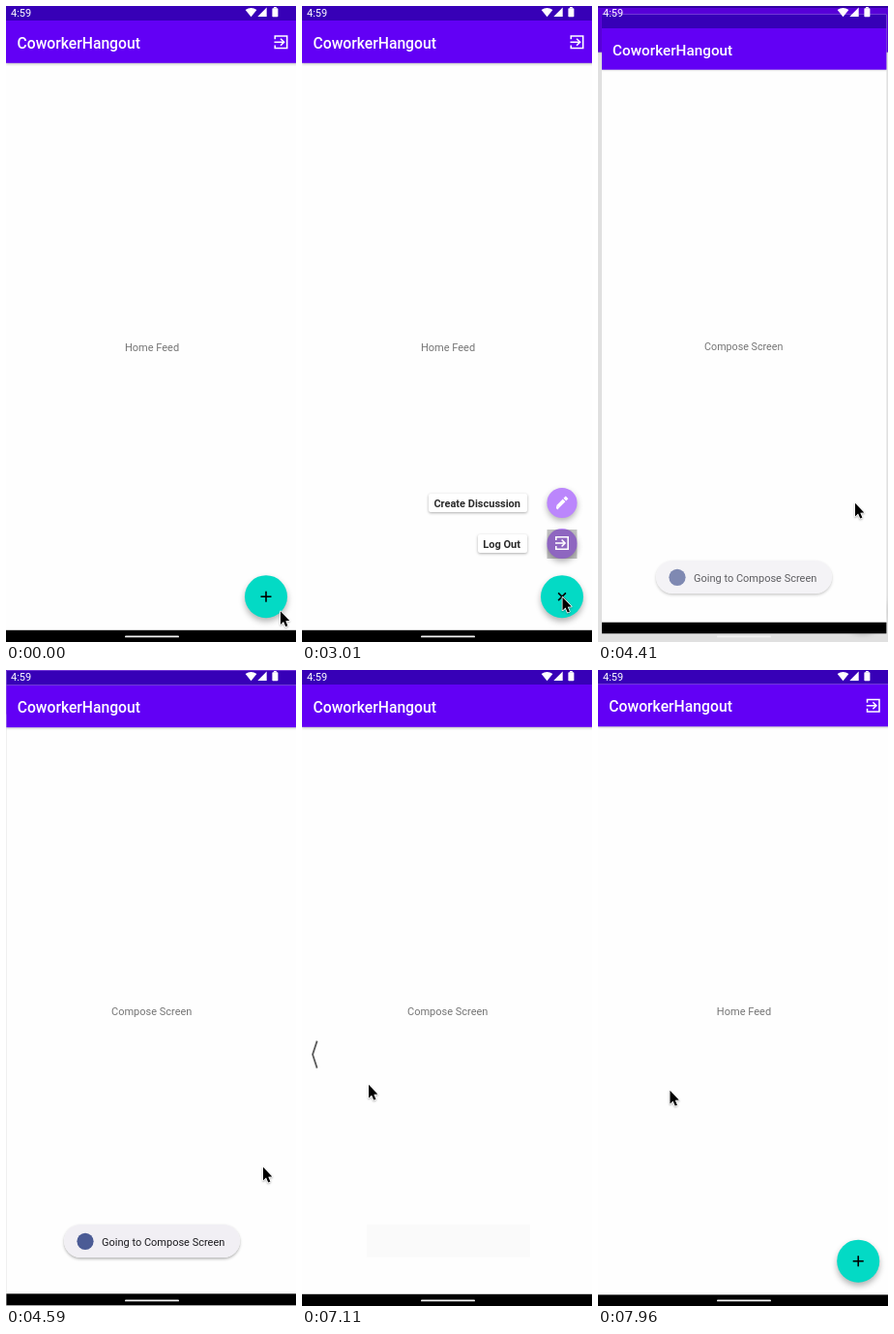
An HTML page with a canvas for the animation above (7990 ms loop, 300 px wide and 656 px high).

```html
<!DOCTYPE html>
<html lang="en">
<head>
<meta charset="utf-8">
<title>Speed dial navigation</title>
<style>
  html, body { margin: 0; width: 100%; height: 100%; overflow: hidden; background: #fefefe; }
  canvas { display: block; width: 300px; height: 656px; }
</style>
</head>
<body>
<canvas id="stage"></canvas>
<script>
const W = 300, H = 656, LOOP = 7990;
const WIN = 302.5; // the phone window runs slightly past the right edge
const canvas = document.getElementById('stage');
const ctx = canvas.getContext('2d');
const dpr = window.devicePixelRatio || 1;
canvas.width = W * dpr;
canvas.height = H * dpr;

const C = {
  status: '#3700b7', bar: '#6200f5', page: '#fefefe', grey: '#757575',
  teal: '#03dac5', lilac: '#bb86fc', toast: '#f1eff4', badge: '#4b5b95'
};
const OPEN = 4295, CLOSE = 7700, SLIDE = 400;

const clamp = v => Math.max(0, Math.min(1, v));
const ramp = (t, a, b) => clamp((t - a) / (b - a));
const smooth = p => p * p * (3 - 2 * p);
const mix = (a, b, p) => a + (b - a) * p;

// Two joined Bezier curves: quick start, very slow finish.
function slowIn(x) {
  if (x <= 0 || x >= 1) return clamp(x);
  const knee = 1 / 6;
  const [xs, ys] = x < knee
    ? [[0, 0.05, 0.133333, knee], [0, 0, 0.06, 0.4]]
    : [[knee, 0.208333, 0.25, 1], [0.4, 0.82, 1, 1]];
  const bez = (p, u) => {
    const v = 1 - u;
    return v * v * v * p[0] + 3 * v * v * u * p[1] + 3 * v * u * u * p[2] + u * u * u * p[3];
  };
  let lo = 0, hi = 1;
  for (let i = 0; i < 24; i++) {
    const mid = (lo + hi) / 2;
    if (bez(xs, mid) < x) lo = mid; else hi = mid;
  }
  return bez(ys, lo);
}

function group(draw, { x = 0, y = 0, scale = 1, turn = 0, alpha = 1 } = {}) {
  if (alpha <= 0 || scale <= 0) return;
  ctx.save();
  ctx.translate(x, y);
  ctx.rotate(turn);
  ctx.scale(scale, scale);
  ctx.globalAlpha *= alpha;
  draw();
  ctx.restore();
}

function rect(x, y, w, h, color) {
  ctx.fillStyle = color;
  ctx.fillRect(x, y, w, h);
}

function text(str, x, y, color, size = 11, weight = 400, align = 'left') {
  ctx.font = `${weight} ${size}px Roboto, sans-serif`;
  ctx.textAlign = align;
  ctx.fillStyle = color;
  ctx.fillText(str, x, y);
}

function disc(x, y, r, color) {
  ctx.beginPath();
  ctx.arc(x, y, r, 0, Math.PI * 2);
  ctx.fillStyle = color;
  ctx.fill();
}

function pill(x, y, w, h, r, color) {
  ctx.beginPath();
  ctx.roundRect(x, y, w, h, r);
  ctx.fillStyle = color;
  ctx.fill();
}

function poly(points, close = true) {
  ctx.beginPath();
  points.forEach(([x, y], i) => i ? ctx.lineTo(x, y) : ctx.moveTo(x, y));
  if (close) ctx.closePath();
}

function stroke(color, width) {
  ctx.strokeStyle = color;
  ctx.lineWidth = width;
  ctx.stroke();
}

function shadowed(blur, dy, alpha, draw) {
  ctx.save();
  ctx.shadowColor = `rgba(0,0,0,${alpha})`;
  ctx.shadowBlur = blur * dpr;
  ctx.shadowOffsetY = dy * dpr;
  draw();
  ctx.restore();
}

function exitIcon(x, y, size) {
  group(() => {
    poly([[-8, -4], [-8, -8], [8, -8], [8, 8], [-8, 8], [-8, 4]], false);
    stroke('#fff', 2);
    poly([[-9, 0], [3.5, 0]], false);
    stroke('#fff', 2);
    poly([[-0.5, -4.5], [4, 0], [-0.5, 4.5]], false);
    stroke('#fff', 2);
  }, { x, y, scale: size / 18 });
}

function pencilIcon() {
  group(() => {
    ctx.fillStyle = '#fff';
    ctx.fillRect(-6, -1.9, 9, 3.8);
    ctx.fillRect(4, -1.9, 3.2, 3.8);
    poly([[-6, -1.9], [-8.6, 0], [-8.6, 1.9], [-6, 1.9]]);
    ctx.fill();
  }, { turn: -Math.PI / 4 });
}

function frame(hasExit) {
  rect(0, 0, WIN, H, C.page);
  shadowed(2.5, 0.8, 0.25, () => rect(0, 15, WIN, 43.8, C.bar));
  rect(0, 0, WIN, 15, C.status);
  text('CoworkerHangout', 11.5, 43.5, '#fff', 15.7, 500);
  if (hasExit) exitIcon(284.5, 37.3, 14);
  rect(0, 643.8, WIN, H - 643.8, '#000');
}

function dialItem(label, y, left, p) {
  group(() => {
    shadowed(3, 1, 0.32, () => pill(left, y - 9.5, 233 - left, 19, 2, '#fff'));
    text(label, 226, y + 4, '#2b2b2b', 11, 700, 'right');
  }, { alpha: p });
  group(() => shadowed(6, 3, 0.3, () => disc(0, 0, 15.6, C.lilac)),
    { x: 269, y, scale: p });
}

function dial(t) {
  const shown = a => smooth(ramp(t, a, a + 150)) * (1 - smooth(ramp(t, 3990, 4190)));
  const low = shown(1450), high = shown(1510);
  if (low > 0) dialItem('Log Out', 554.5, 182, low);
  if (high > 0) dialItem('Create Discussion', 512.5, 131, high);
  if (t >= 1810 && t < 3990) rect(253.5, 540, 31, 30, 'rgba(0,0,0,.24)');
  group(() => exitIcon(0, 0, 14), { x: 269, y: 554, scale: low });
  group(pencilIcon, { x: 269, y: 512, scale: high });

  shadowed(6, 3.5, 0.3, () => disc(269, 609.2, 22, C.teal));
  group(() => {
    rect(-5.5, -0.8, 11, 1.6, '#000');
    rect(-0.8, -5.5, 1.6, 11, '#000');
  }, { x: 269, y: 609.2, turn: low * Math.PI / 4 });
}

function home(t) {
  frame(true);
  text('Home Feed', 151, 356, C.grey, 11, 400, 'center');
  dial(t);
}

function compose(t) {
  frame(false);
  text('Compose Screen', 150.7, 356, C.grey, 11, 400, 'center');
  if (t > 6560) rect(67, 572, 169, 33.5, '#fafafa');
}

function zoom(draw, scale, alpha = 1) {
  group(() => {
    ctx.translate(-WIN / 2, -H / 2);
    ctx.beginPath();
    ctx.rect(0, 0, WIN, H);
    ctx.clip();
    draw();
  }, { x: WIN / 2, y: H / 2, scale, alpha });
}

function screens(t) {
  const open = slowIn(ramp(t, OPEN, OPEN + SLIDE));
  const back = slowIn(ramp(t, CLOSE, CLOSE + SLIDE));
  if (t >= CLOSE) {
    zoom(() => home(0), mix(1.1, 1, back));
    zoom(() => compose(t), mix(1, 0.9, back), 1 - ramp(t, CLOSE + 35, CLOSE + 85));
    return;
  }
  if (open < 1) zoom(() => home(t), mix(1, 1.05, open));
  if (open > 0) {
    rect(0, 0, W, H, `rgba(0,0,0,${0.14 * open})`);
    zoom(() => compose(t), mix(0.85, 1, open), ramp(t, OPEN + 20, OPEN + 80));
  }
}

function toast(t) {
  const out = ramp(t, 6340, 6560);
  const alpha = ramp(t, 4300, 4460) * (1 - out);
  group(() => {
    // The shadow fades on its own so that it never tints the body.
    shadowed(3, 1.5, 0.3 * alpha, () => {
      ctx.globalAlpha = 1;
      pill(-91, -17, 182, 34, 17, C.page);
    });
    pill(-91, -17, 182, 34, 17, C.toast);
    disc(-69, 0.3, 8.6, C.badge);
    text('Going to Compose Screen', -52, 4.5, '#1c1b1f');
  }, { x: 151, y: 589, scale: mix(1, 0.93, out), alpha });
}

function systemBar() {
  text('4:59', 5, 11, '#fff');
  ctx.fillStyle = '#fff';
  ctx.beginPath();
  ctx.moveTo(253.5, 11.3);
  ctx.lineTo(247.6, 4);
  ctx.quadraticCurveTo(253.5, -0.2, 259.4, 4);
  ctx.closePath();
  ctx.fill();
  poly([[260.3, 11], [269.7, 11], [269.7, 1.6]]);
  ctx.fill();
  pill(275.4, 2.2, 6, 9, 0.8, '#fff');
  rect(277, 1, 2.8, 1.5, '#fff');
  pill(123, 649.5, 56, 1.8, 0.9, '#f2f2f2');
}

function chevron(t) {
  const p = smooth(ramp(t, 6985, 7090));
  group(() => {
    poly([[15.6, 382.6], [11, 396.6], [15.6, 410.6]], false);
    stroke('#5c5c5c', 1.8);
  }, { x: mix(-14, 0, p), alpha: p * (1 - ramp(t, 7220, 7300)) });
}

const path = [
  [0, 284, 625], [90, 284, 625], [380, 268.5, 614.5], [1000, 268.5, 614.5],
  [1090, 268.5, 613], [1780, 268.5, 613], [1810, 269.5, 610.5], [3010, 269.5, 610.5],
  [3400, 262.5, 500], [3630, 266, 513.5], [5360, 266, 513.5], [5770, 103, 499],
  [6140, 10, 474], [6170, 9, 473], [6640, 1.5, 435], [6970, 1.5, 435],
  [7110, 69, 428.5], [7300, 74.5, 434.5], [LOOP, 74.5, 434.5]
];

function pointer(t) {
  const i = Math.max(1, path.findIndex(k => k[0] > t));
  const [a, x0, y0] = path[i - 1], [b, x1, y1] = path[i];
  // The long sweep to the left passes its middle key without stopping.
  const u = ramp(t, a, b);
  const p = a === 5360 ? u * u * (2 - u) : a === 5770 ? 1 - (1 - u) ** 2 : smooth(u);
  group(() => {
    poly([[0, 0], [0, 14.6], [3.3, 11.6], [5.6, 17], [8, 16], [5.7, 10.7], [10, 10.5]]);
    ctx.lineJoin = 'round';
    shadowed(2, 1, 0.3, () => stroke('#fff', 1.6));
    ctx.fillStyle = '#000';
    ctx.fill();
  }, { x: mix(x0, x1, p), y: mix(y0, y1, p) - 0.7, scale: 0.93 });
}

function render(t) {
  ctx.setTransform(dpr, 0, 0, dpr, 0, 0);
  rect(0, 0, W, H, C.page);
  screens(t);
  toast(t);
  chevron(t);
  systemBar();
  pointer(t);
}

const start = performance.now();
function tick() {
  render((performance.now() - start) % LOOP);
  requestAnimationFrame(tick);
}
tick();
</script>
</body>
</html>
```
